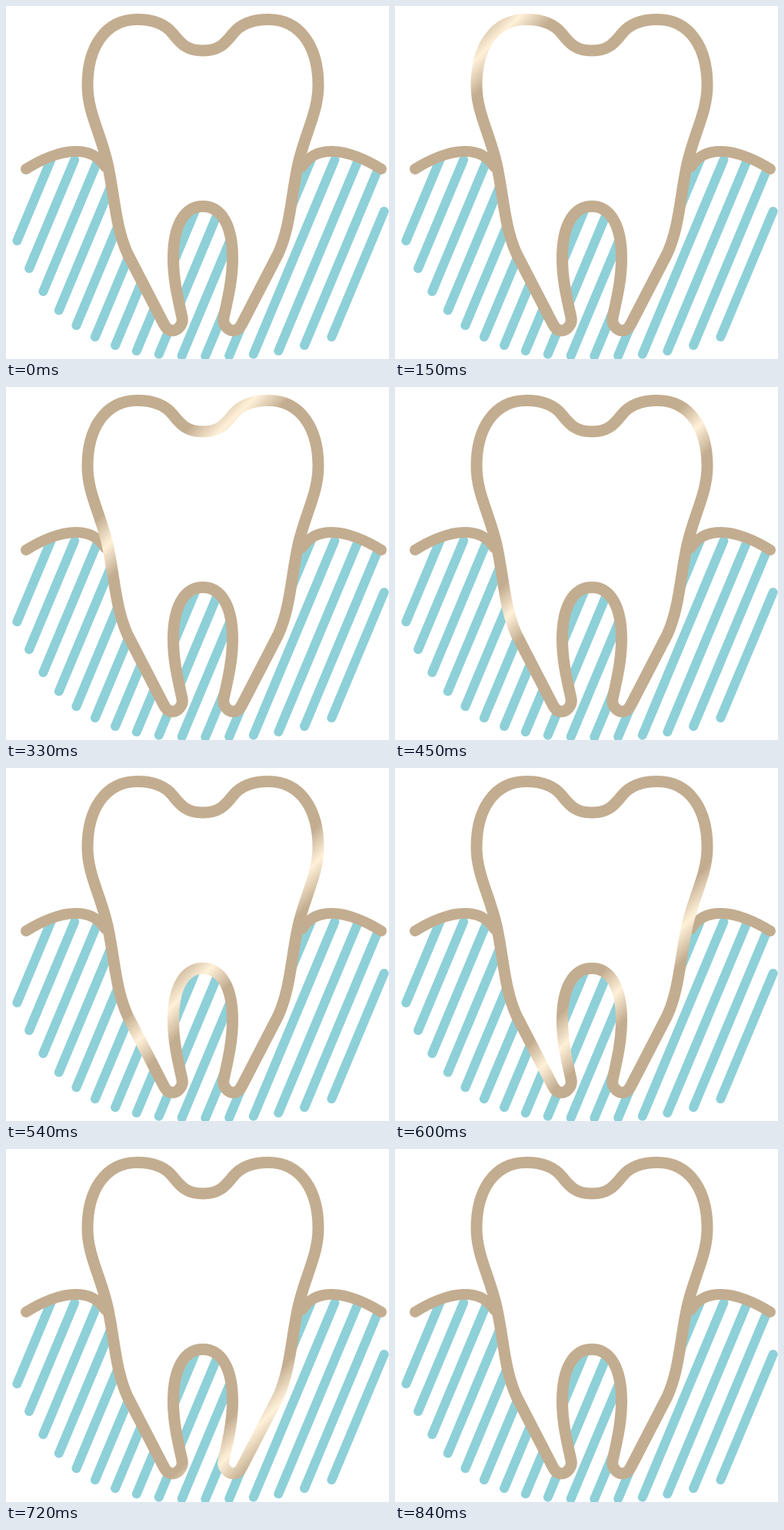
An HTML page that plays this animation: 498 px wide and 459 px high, repeating every 1.87 s.

```html
<!DOCTYPE html>
<html lang="en">
<head>
<meta charset="utf-8">
<title>Tooth with a passing glint</title>
<style>
html, body { margin: 0; width: 100%; height: 100%; overflow: hidden; background: #fff; }
svg { display: block; }
</style>
</head>
<body>
<svg width="498" height="459" viewBox="0 0 498 459" fill="none" stroke-linecap="round" stroke-linejoin="round">
  <linearGradient id="glint" gradientUnits="userSpaceOnUse" x1="-23" y1="-23" x2="23" y2="23">
    <stop offset="0" stop-color="#c3ad90"/>
    <stop offset=".5" stop-color="#fff1d9"/>
    <stop offset="1" stop-color="#c3ad90"/>
  </linearGradient>
  <path id="hatch" stroke="#8ed0d8" stroke-width="12"/>
  <path id="gum" stroke="#c3ad90" stroke-width="14" d="M26 212C45 200 70 189 90 189S120 196 129 209"/>
  <path id="tooth" fill="#fff" stroke="url(#glint)" stroke-width="15" d="M256 58
    C236 58 228 50 217 36S190 17.5 171 17.5
    C128 17.5 106 55 106 103C106 138 123 165 132 205
    S142 287 158 322L204 411
    C208 419 211 422 217 422S231 414 229 405
    C223 378 217.5 355 217.5 328C217.5 285 232 260.5 256 260.5"/>
</svg>
<script>
const LOOP = 1870, STEP = 30, START = 90, END = 840;
const LINES = 16, GAP = 30.75, LEAN = 0.418;
const el = id => document.getElementById(id);

// Adds the right half of a path by reflecting x about the line x = sum / 2
function mirror(id, sum) {
  const half = el(id).getAttribute('d');
  const flipped = half.replace(/([\d.]+) ([\d.]+)/g, (_, x, y) => `${sum - x} ${y}`);
  el(id).setAttribute('d', half + flipped);
}

// Evenly spaced leaning lines: rounded lower edge, tops under the gum or tooth
function hatch() {
  let d = '';
  for (let k = 0; k < LINES; k++) {
    const bottom = 455 - 0.376 * Math.abs(k - 10) ** 2.6;
    const top = Math.max(200, 213 + 54 * (k - 14));
    const x = y => 142 + GAP * k - LEAN * y;
    d += `M${x(bottom)} ${bottom}L${x(top)} ${top}`;
  }
  el('hatch').setAttribute('d', d);
}

// The glint crosses diagonally in fixed steps, then rests off stage
function draw(now) {
  const t = Math.floor(now % LOOP / STEP) * STEP;
  const pos = t >= START && t < END ? 20 + 0.45 * t : -200;
  el('glint').setAttribute('gradientTransform', `translate(${pos} ${pos})`);
}

mirror('gum', 514);
mirror('tooth', 512);
hatch();

const origin = performance.now();
function frame() {
  draw(performance.now() - origin);
  requestAnimationFrame(frame);
}
frame();
</script>
</body>
</html>
```
